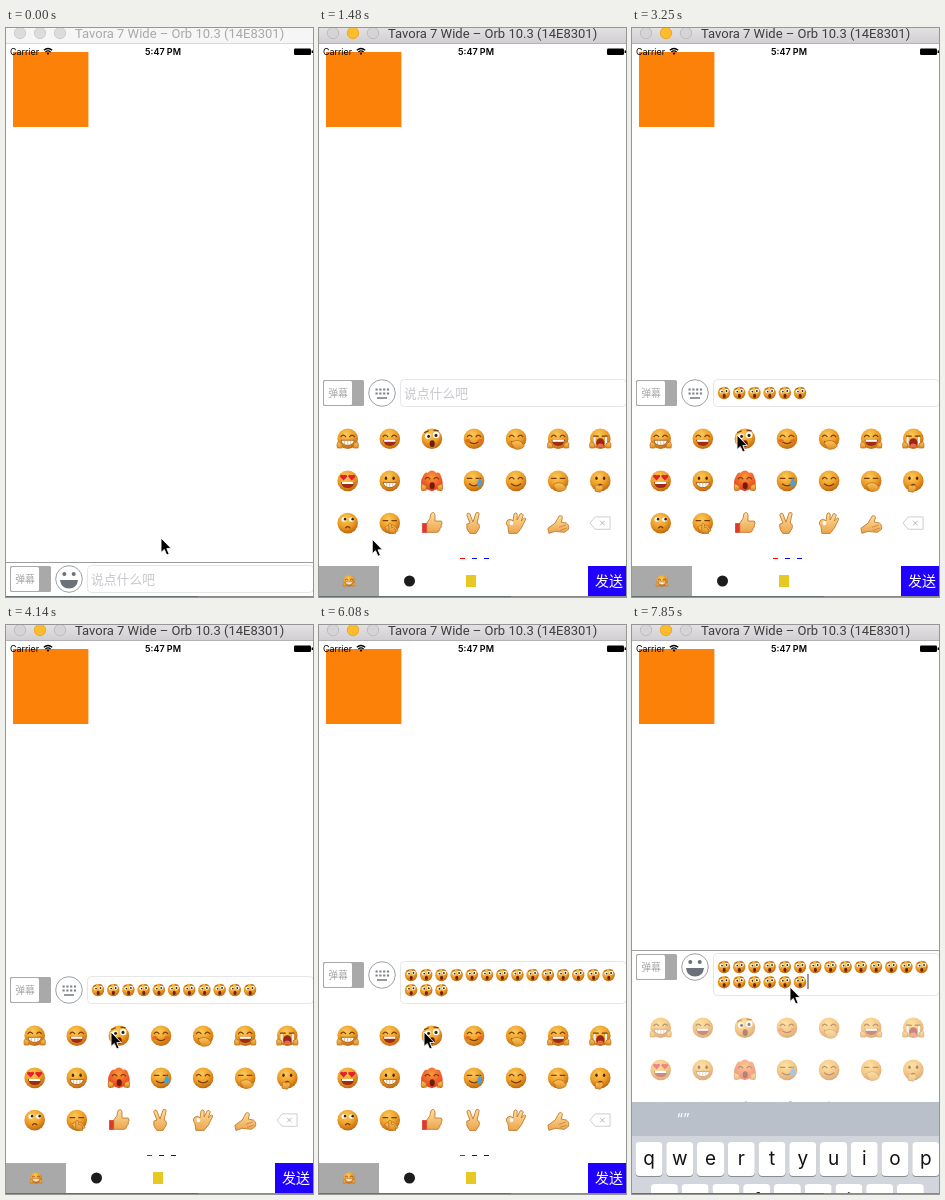
Recreate the animation shown at these times as an HTML page. Size 307 px wide and 569 px high, loop 8000 ms.

```html
<!DOCTYPE html>
<html lang="zh">
<head>
<meta charset="utf-8">
<title>Emoji input bar</title>
<style>
  html, body { margin: 0; width: 307px; height: 569px; overflow: hidden; background: #fff; }
  svg { display: block; }
  text { font-family: Inter, Roboto, sans-serif; }
  .cjk { font-family: "Noto Sans CJK SC", "Noto Sans CJK", "Noto Sans", sans-serif; }
  .title { font: 13px Roboto, sans-serif; fill: #a9a9a9; }
  .lights circle { fill: #dcdcdc; stroke: #cfcfcf; }
  .active .title { fill: #3e3e3e; }
  .active .bar { fill: url(#chrome); }
  .active .edge { fill: #b4b2b4; }
  .active .lights circle { fill: #d6d4d6; stroke: #bfbdbf; }
  .active .lights .mid { fill: #fdbc2e; stroke: #e9ab2a; }
  .key { fill: #fff; filter: drop-shadow(0 1px 0 #898c90); }
  .letter { font-size: 19px; text-anchor: middle; fill: #111; }
</style>
</head>
<body>
<svg id="stage" width="307" height="569" viewBox="0 0 307 569">
  <defs>
    <linearGradient id="chrome" x2="0" y2="1">
      <stop stop-color="#e3e1e3"/><stop offset="1" stop-color="#d1cfd1"/>
    </linearGradient>
    <radialGradient id="skin" cx=".42" cy=".3" r=".72">
      <stop stop-color="#fbcb5c"/><stop offset=".55" stop-color="#ef9f26"/><stop offset="1" stop-color="#bd6510"/>
    </radialGradient>
    <radialGradient id="hot" cx=".5" cy=".3" r=".7">
      <stop stop-color="#fb9a3a"/><stop offset="1" stop-color="#e8381c"/>
    </radialGradient>
    <linearGradient id="palm" x2="0" y2="1">
      <stop stop-color="#ffdf9e"/><stop offset="1" stop-color="#eaa54e"/>
    </linearGradient>
    <linearGradient id="paw" x2="0" y2="1">
      <stop stop-color="#fbc65c"/><stop offset="1" stop-color="#e08e24"/>
    </linearGradient>
  </defs>

  <rect width="307" height="569" fill="#fff"/>
  <rect x="7" y="24" width="75.400" height="75" fill="#fb8108"/>

  <g id="window">
    <rect class="bar" width="307" height="15" fill="#f6f6f6"/>
    <rect class="edge" y="15" width="307" height="1" fill="#d8d8d8"/>
    <g class="lights">
      <circle cx="14" cy="5" r="5.700"/><circle class="mid" cx="34" cy="5" r="5.700"/><circle cx="54" cy="5" r="5.700"/>
    </g>
    <text class="title" x="69" y="10">Tavora 7 Wide – Orb 10.3 (14E8301)</text>
  </g>

  <g id="status">
    <text x="4" y="27" font-size="8.900">Carrier</text>
    <g fill="none" stroke="#000" stroke-width="1.300">
      <path d="M37.800 22.300q4.200-3.600 8.400 0M39.400 24q2.600-2.200 5.200 0"/>
      <circle cx="42" cy="25.600" r=".5"/>
    </g>
    <text x="157" y="27" font-size="9" font-weight="600" text-anchor="middle">5:47 PM</text>
    <rect x="288" y="20.500" width="17" height="6.500" rx="1.200"/><rect x="305.600" y="22.500" width="1.400" height="2.500"/>
  </g>

  <g id="panel">
    <g id="faces"></g>
    <g id="tabs">
      <path d="M141 530.500h5" stroke="#f00"/><path d="M153 530.500h5m7 0h5" stroke="#00f"/>
      <rect y="538" width="60" height="31" fill="#a9a9a9"/>
      <circle cx="90.500" cy="553" r="5.500" fill="#1c1c1c"/>
      <rect x="147" y="547" width="10" height="12" fill="#e8c822"/>
      <rect x="269" y="538" width="38" height="31" fill="#2000ff"/>
      <text class="cjk" x="290" y="558" font-size="14" text-anchor="middle" fill="#fff">发送</text>
    </g>
  </g>

  <g id="toolbar">
    <rect id="back" y="-17" width="307" height="34" fill="#fff"/>
    <path id="rule" d="M0-16.500h307" stroke="#9c9c9c"/>
    <rect x="4" y="-13" width="41" height="26" rx="1.500" fill="#a9a9a9"/>
    <rect x="5" y="-12" width="28" height="24" rx="1.500" fill="#fff"/>
    <text class="cjk" x="19" y="3.600" font-size="9.800" text-anchor="middle" fill="#a4a4a4">弹幕</text>
    <circle cx="63" r="13.300" fill="#fff" stroke="#84888d" stroke-width=".8"/>
    <g id="smile" fill="#6b7178">
      <circle cx="58.300" cy="-5" r="2"/><circle cx="67.700" cy="-5" r="2"/>
      <path d="M54 1h18q-1 8.500-9 8.500t-9-8.500z"/>
    </g>
    <g id="keys" stroke="#7b8187" fill="none">
      <path d="M56.500-3.500h13.600M56.500.5h13.600" stroke-width="2.200" stroke-dasharray="2.200 1.600"/>
      <path d="M58 5h10" stroke-width="1.600"/>
    </g>
    <rect id="field" x="81.500" y="-13.500" width="226" height="27" rx="4" fill="#fff" stroke="#e6e6e6"/>
    <text id="hint" class="cjk" x="85" y="4.600" font-size="12.800" fill="#c7c7cd">说点什么吧</text>
    <g id="typed"></g>
    <path id="caret" d="M176 7v15" stroke="#555" stroke-width="1.200"/>
  </g>

  <g id="keyboard">
    <rect y="477" width="307" height="34" fill="#b9c0c9"/>
    <rect y="511" width="307" height="58" fill="#d2d5db"/>
    <text x="51" y="499" font-size="15" text-anchor="middle" fill="#fff">“”</text>
  </g>

  <rect y="568" width="307" height="1" fill="#8a8a8a"/>
  <rect y="568" width="192" height="1" fill="#667072"/>
  <path id="cursor" d="M0 0V14.500L3.300 11.500 5.700 17 8.200 16 5.800 10.600H10.300Z" stroke="#fff" stroke-width=".9"/>
</svg>

<script>
const $ = id => document.getElementById(id);
const line = (d, color = '#7a3c0a', w = 1.2) =>
  `<path d="${d}" fill="none" stroke="${color}" stroke-width="${w}" stroke-linecap="round"/>`;
const fill = (d, color) => `<path d="${d}" fill="${color}"/>`;
const oval = (x, y, rx, ry, color) => `<ellipse cx="${x}" cy="${y}" rx="${rx}" ry="${ry}" fill="${color}"/>`;
const pair = (x, y, rx, ry, color) => oval(-x, y, rx, ry, color) + oval(x, y, rx, ry, color);
const hand = (d, tone = 'palm') =>
  `<path d="${d}" fill="url(#${tone})" stroke="#bd7222" stroke-width=".8" stroke-linejoin="round"/>`;
const heart = x => fill(`M${x}-.5l-3.500-3.500q0-3 3.500-1.500 3.500-1.500 3.500 1.500z`, '#e3202c');

// Emoji pieces, drawn in a box from -10 to 10
const parts = {
  face: oval(0, 0, 10, 10, 'url(#skin)'),
  hotface: fill('M-9 10q-3-9 0-14 2-5 5-4 4-4 8 0 4-1 5 4 3 6 0 14l-4-2-5 2-5-2z', 'url(#hot)'),
  arcs: line('M-6.500-2q2-3 4.500 0M2-2q2-3 4.500 0'),
  dots: pair(3.7, -2.5, 1.2, 1.7, '#4f2608'),
  shut: line('M-6.500-2.500h4.500M2-2.500h4.500'),
  side: pair(3.7, -3.5, 2.5, 2.2, '#fff') + oval(-2.6, -3.8, 1.2, 1.3, '#321') + oval(4.8, -3.8, 1.2, 1.3, '#321'),
  wide: oval(-4, -2.4, 2.7, 2.7, '#fff') + oval(4.2, -3.6, 3.2, 3.2, '#fff') +
    oval(-3.2, -2.3, 1.4, 1.5, '#321') + oval(4, -3.2, 1.5, 1.6, '#321') + line('M-7-6l3.500-1.500M2-8.300l4 .5'),
  hearts: heart(-4) + heart(4),
  teeth: `<path d="M-6.500 1.500h13q-1 5-6.500 5t-6.500-5z" fill="#fff" stroke="#9a5414" stroke-width=".8"/>` + line('M-3 2v3.500M0 2v4M3 2v3.500', '#c9935a', .6),
  laugh: fill('M-6.500 1h13q-1 6-6.500 6t-6.500-6z', '#a02c16') + fill('M-5.500 1h11v2h-11z', '#fff'),
  gasp: oval(.3, 4.7, 2.5, 3.3, '#6d1f0c'),
  smile: line('M-4.500 3q4.500 3.500 9 0'),
  wail: oval(0, 4, 4, 4.5, '#9c2613') + oval(0, 6.5, 2.8, 1.8, '#e86a54'),
  pout: line('M-2 4.500q2-2 4 0'),
  blush: pair(6, 2, 2.7, 1.8, '#ea6a24'),
  tears: line('M-5.500-1v7M5.500-1v7', '#e6f2f7', 2),
  sweat: fill('M5-3q5 5 2 8-4 2-4-2z', '#4d9fd8'),
  hands: hand('M-10 9q-1-5 1-6l3.500 2 0 4z', 'paw') + hand('M10 9q1-5-1-6l-3.500 2 0 4z', 'paw'),
  cover: hand('M-5 4q5-4 10-1l3 4q-3 4-9 3z', 'paw'),
  chin: hand('M-5 10v-5q1-2 4 0l3-1 1 3-3 4z', 'paw'),
  finger: hand('M-1 9V1q1-2 2.500 0v3q5 0 4 6z', 'paw'),
  thumb: hand('M-5 0q4-4 4-9 3-3 4 1v6h6q2 2 0 4 1 2-1 3 0 2-1 2 0 2-2 2h-10z') + fill('M-9.500 0h4.500v9.500h-4.500z', '#dc3a2c'),
  peace: hand('M-4 10q-4-4-3-9l3-1-3-8q1-3 3-1l3 8 3-9q3-1 3 1l-2 9q3 1 2 5l-3 5z'),
  okay: hand('M-7 10l-1-7q-3-3 0-6 3-2 5 1l1-7q2-2 3 0v6l3-6q2-1 3 1l-2 6 3-3q2 0 1 2l-4 8-4 5z') + oval(-4.5, 0, 1.8, 2, '#fff'),
  fist: hand('M-10 5l7-5 4-7q3-1 3 2l-1 4 5 1q3 2 2 6l-4 3-9-1-6 2z') + line('M1 4l6-2M2 7l6-2', '#c8843c', .8),
  erase: `<path d="M-10 0l5-6h14.500v12h-14.500z" fill="#fff" stroke="#c4c4c4" stroke-width=".8"/>` + line('M0-2l4 4m0-4l-4 4', '#aaa', .8)
};
const recipes = [
  'face arcs teeth hands', 'face arcs laugh', 'face wide gasp', 'face arcs smile blush',
  'face arcs smile cover', 'face arcs laugh hands', 'face shut wail tears hands',
  'face hearts laugh', 'face dots teeth', 'hotface arcs gasp hands', 'face shut smile sweat',
  'face arcs smile', 'face shut pout cover', 'face dots pout chin',
  'face side pout', 'face shut cover finger', 'thumb', 'peace', 'okay', 'fist', 'erase'
];
const emoji = (recipe, x, y, s) =>
  `<g transform="translate(${x} ${y}) scale(${s})">${recipe.split(' ').map(p => parts[p]).join('')}</g>`;

$('faces').innerHTML = recipes.map((r, i) =>
  emoji(r, 28.7 + i % 7 * 42.1, 410.7 + Math.floor(i / 7) * 42.2, 1.03)).join('');
$('tabs').insertAdjacentHTML('beforeend', emoji(recipes[0], 30, 553, .58));

const perRow = 14;
$('typed').innerHTML = Array.from({ length: 20 }, (_, i) =>
  emoji(recipes[2], 92 + i % perRow * 15.2, Math.floor(i / perRow) * 15.2, .62)).join('');

['qwertyuiop', 'asdfghjkl'].forEach((row, r) => [...row].forEach((ch, i) => {
  const x = 17 + r * 15.4 + i * 30.75, y = 517 + r * 42;
  $('keyboard').insertAdjacentHTML('beforeend',
    `<rect class="key" x="${x - 13.5}" y="${y}" width="27" height="34" rx="4"/>
     <text class="letter" x="${x}" y="${y + 23}">${ch}</text>`);
}));

const LOOP = 8000, TICK = 148;
const FOCUS = 5, OPEN = 7, TYPE = 53;
const taps = [17, 18, 19, 20, 21, 22, 24, 25, 26, 27, 28, 30, 31, 34, 36, 39, 41, 42, 43, 44];
const baseKeys = [[0, 551], [7, 550], [8, 410], [9, 365], [53, 357]];
const growKeys = [[0, 0], [36, 8], [37, 15]];
const path = [[0, 155, 510], [6, 62, 547], [8, 62, 547], [16, 27, 404], [17, 105, 407],
  [45, 105, 407], [50, 184.5, 360.5], [52, 184.5, 360.5], [53, 158, 362], [60, 158, 362]];

const held = (keys, k) => keys.filter(([at]) => at <= k).pop()[1];
const move = (id, x, y) => $(id).setAttribute('transform', `translate(${x} ${y})`);
const show = (node, on) => { node.style.display = on ? '' : 'none'; };

function pointer(k) {
  const i = path.findIndex(p => p[0] > k);
  const [t0, x0, y0] = path[i - 1], [t1, x1, y1] = path[i];
  const f = (k - t0) / (t1 - t0);
  return [x0 + (x1 - x0) * f, y0 + (y1 - y0) * f];
}

let last = -1;
function draw(k) {
  const base = held(baseKeys, k), grow = held(growKeys, k);
  const count = taps.filter(t => t <= k).length;
  const panelOpen = k >= OPEN && k < TYPE, typing = k >= TYPE;

  $('window').classList.toggle('active', k >= FOCUS);
  move('toolbar', 0, base - grow);
  move('panel', 0, base - 365);
  $('panel').style.opacity = typing ? .55 : 1;
  $('back').setAttribute('height', 34 + grow);
  $('field').setAttribute('height', 27 + grow);
  show($('keys'), panelOpen);
  show($('smile'), !panelOpen);
  show($('rule'), !panelOpen);
  show($('hint'), !count);
  show($('caret'), typing);
  show($('keyboard'), typing);
  [...$('typed').children].forEach((node, i) => show(node, i < count));
  move('cursor', ...pointer(k));
}

function loop(now) {
  const k = Math.floor((now % LOOP + 7) / TICK);
  if (k !== last) draw(last = k);
  requestAnimationFrame(loop);
}
draw(0);
requestAnimationFrame(loop);
</script>
</body>
</html>
```
